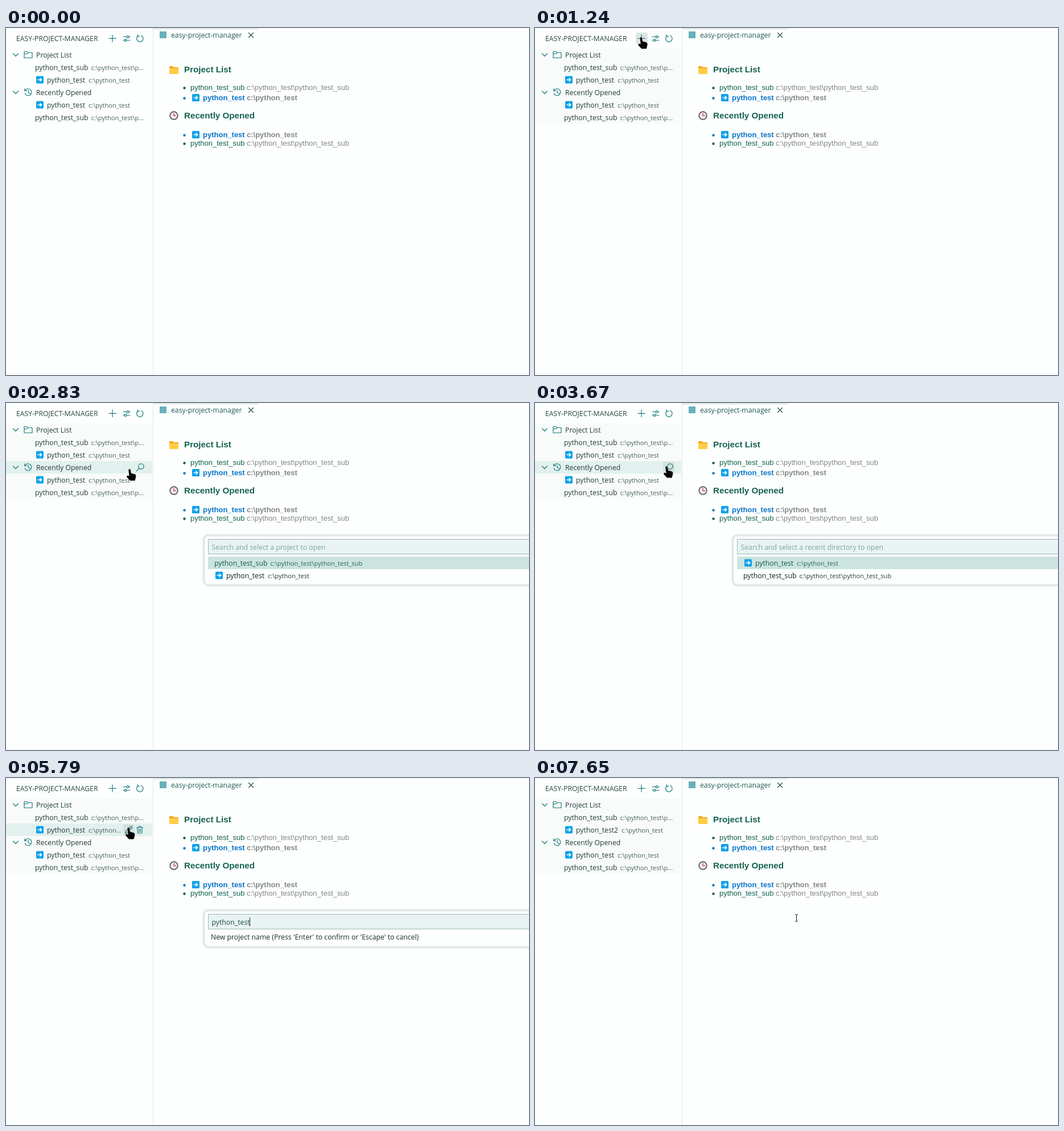
An HTML page for the animation above (8000 ms loop, 919 by 610 pixels).

```html
<!DOCTYPE html>
<html lang="en">
<head>
<meta charset="utf-8">
<title>Project manager</title>
<style>
html, body { margin: 0; width: 100%; height: 100%; overflow: hidden; background: #fcfffe; }
svg { display: block; width: 919px; height: 610px; }
text { font-family: "Open Sans", "Noto Sans", sans-serif; font-size: 12.25px; fill: #213b37; white-space: pre; }
.web { font-family: "Liberation Sans", Arial, sans-serif; font-size: 13px; }
.head { font-size: 15.2px; font-weight: bold; }
.bold { font-weight: bold; }
.desc { font-size: 11.1px; fill: #48605c; }
.icon { fill: none; stroke: #1b7a80; stroke-width: 1.2; stroke-linecap: round; stroke-linejoin: round; }
</style>
</head>
<body>
<svg id="stage" viewBox="0 0 919 610" xmlns="http://www.w3.org/2000/svg"></svg>
<script>
const LOOP = 8000;
const stage = document.getElementById('stage');
const TEST = 'python_test', SUB = 'python_test_sub';
const TEST_PATH = 'c:\\python_test', SUB_PATH = TEST_PATH + '\\' + SUB;

// Pointer path: time, x, y
const path = [
  [160, 486, 592], [240, 466, 522], [320, 427, 425], [360, 402, 388],
  [440, 292, 250], [520, 236, 170], [600, 210, 120], [680, 194, 98],
  [960, 194, 97], [1200, 186, 16], [1440, 187, 16], [1600, 212, 36],
  [1760, 231, 50], [1880, 229, 52], [2630, 229, 52], [2830, 217, 116],
  [3190, 229, 114], [3350, 229, 114], [3390, 231, 111], [4210, 231, 111],
  [4530, 215, 87], [5790, 215, 87], [5910, 268, 125], [6070, 380, 210],
  [6190, 425, 232], [6310, 438.5, 239], [6470, 438.5, 239], [6790, 459.5, 246]
];

function pointer(t) {
  const i = path.findIndex(k => k[0] > t);
  if (i === 0) return null;
  if (i < 0) return path[path.length - 1].slice(1);
  const [t0, x0, y0] = path[i - 1], [t1, x1, y1] = path[i];
  const f = (t - t0) / (t1 - t0);
  return [x0 + (x1 - x0) * f, y0 + (y1 - y0) * f];
}

const rect = (x, y, w, h, fill, more = '') =>
  `<rect x="${x}" y="${y}" width="${w}" height="${h}" fill="${fill}" ${more}/>`;
const text = (x, y, s, cls = '', fill = '') =>
  `<text x="${x}" y="${y}" class="${cls}"${fill && ` style="fill:${fill}"`}>${s}</text>`;
const icon = (d, more = '') => `<path class="icon" d="${d}" ${more}/>`;
const rowTop = i => 36 + 22 * i;

// Blue square with a white arrow, centred on x, y
const badge = (x, y) => rect(x - 6.5, y - 6.5, 13, 13, '#0aa2ea', 'rx="1.5"') +
  `<path d="M${x - 4} ${y}h7m-3-3 3 3-3 3" fill="none" stroke="#fff" stroke-width="1.7"/>`;

const lens = (x, y) =>
  `<circle class="icon" cx="${x + 1.5}" cy="${y - 1.5}" r="4.7"/>` + icon(`M${x - 2} ${y + 2}l-4.5 4.5`);

const pencil = icon('M209.5 97.5l1-4 8-8q1.300-1.300 2.600 0t0 2.600l-8 8zM217 87l2.600 2.600');
const trash = icon('M229.500 87h11M233 87v-2h4v2M230.800 87l.7 10h7l.7-10M233.700 89.500v5M236.300 89.500v5');

function toolbar(p) {
  const onAdd = p && p[1] < 30 && p[0] > 177 && p[0] < 198;
  return text(18, 23, 'EASY-PROJECT-MANAGER', 'title', '#2c4642')
    .replace('class="title"', 'font-size="10.9" class="title"') +
    (onAdd ? rect(177, 8, 21, 21, '#dce7e5', 'rx="4"') : '') +
    icon('M187 12v12.500M181 18.300h12.500') +
    icon('M206 15.500h6M216 15.500h2M206 21.500h2M212 21.500h6') +
    '<circle class="icon" cx="214" cy="15.5" r="1.9"/><circle class="icon" cx="210" cy="21.5" r="1.9"/>' +
    icon('M232 14a5.700 5.700 0 1 0 5.500-.7M231.200 11.500v3.200h3.300');
}

function tree(t, p) {
  const inTree = p && p[0] < 257 && p[1] >= 36 && p[1] < 168;
  const hover = inTree ? Math.floor((p[1] - 36) / 22) : -1;
  let s = '';
  for (let i = 0; i < 6; i++) {
    let fill = t >= (i < 2 ? 1040 : 600) ? '#f8fbfa' : '';
    if (i === hover) fill = '#e2f1ee';
    if (hover === 0 && i < 2) fill = '#ebf4f2';
    if (fill) s += rect(0, rowTop(i), 257, 22, fill);
  }
  const group = (i, label) => {
    const y = rowTop(i) + 11;
    return icon(`M12.500 ${y - 2}l4.500 4.500 4.500-4.500`) + text(53, y + 5, label);
  };
  const sub = i => text(51, rowTop(i) + 16, SUB) +
    text(149.5, rowTop(i) + 16, hover === i && i === 1 ? 'c:\\pyth...' : 'c:\\python_test\\p...', 'desc');
  const main = (i, label, x, dir) => badge(59.5, rowTop(i) + 11) +
    text(72, rowTop(i) + 16, label) + text(x, rowTop(i) + 16, dir, 'desc');
  const renamed = t >= 7630;

  s += group(0, 'Project List') + icon('M32 52.500v-11h5l1.500 2h7.500v9zM32 45.500h5l1.500-2');
  s += sub(1);
  s += main(2, renamed ? TEST + '2' : TEST, renamed ? 152 : 145, hover === 2 ? 'c:\\python...' : TEST_PATH);
  s += group(3, 'Recently Opened') + icon('M33.500 110a6 6 0 1 1-.3 4.800M32.800 106.800v3.700h3.700M39.200 109.500v4l3 1.800');
  s += main(4, TEST, 145, TEST_PATH) + sub(5);

  if (hover === 0 || hover === 3) {
    const y = rowTop(hover) + 11;
    if (p[0] > 225 && p[1] < y + 9 && (hover === 0 || t >= 3350))
      s += rect(225, y - 10, 20, 20, '#d3e2df', 'rx="4"');
    s += lens(236, y);
  }
  if (hover === 1 || hover === 2) {
    const onPencil = hover === 2 && p[0] > 207 && p[1] < 92;
    if (onPencil) s += rect(206, 81, 20, 20, '#d3e2df', 'rx="4"');
    s += `<g transform="translate(0 ${hover === 1 ? -22 : 0})">${pencil}${trash}</g>`;
  }
  return s;
}

function page() {
  const green = '#14624f', blue = '#0a74c9', gray = '#858787';
  const dot = (y, fill) => `<circle cx="313.500" cy="${y}" r="2.200" fill="${fill}"/>`;
  const sub = y => dot(y - 3.5, green) + text(324, y, SUB, 'web', green) + text(423, y, SUB_PATH, 'web', gray);
  const main = y => dot(y - 3.5, blue) + badge(333.5, y - 4.5) +
    text(346, y, TEST, 'web bold', blue) + text(423, y, TEST_PATH, 'web bold', gray);
  return rect(258, 0, 1, 610, '#dfe9e7') + rect(259, 1, 185, 1, '#bfd5d1') +
    rect(270, 6, 12, 12, '#68b0bb') +
    text(290, 17, 'easy-project-manager', '', '#1f5952') +
    icon('M426.500 8.500l8 8M434.500 8.500l-8 8', 'style="stroke:#1f4f49"') +
    '<path d="M287 80v-12q0-1 1-1h5l2 2h7q1 0 1 1v10z" fill="#f3ad22"/>' +
    '<path d="M287 71h16v9q0 1-1 1h-14q-1 0-1-1z" fill="#ffcd45"/>' +
    text(313, 78, 'Project List', 'web head', green) +
    sub(109) + main(127) +
    '<circle cx="295" cy="154" r="6.800" fill="#eceaec" stroke="#5b555b" stroke-width="1.700"/>' +
    '<path d="M295 149.500v4.700h4" fill="none" stroke="#c93b50" stroke-width="1.300"/>' +
    text(313, 159, 'Recently Opened', 'web head', green) +
    main(192) + sub(207);
}

const panel = bottom =>
  rect(347.5, 232.5, 640, bottom - 234, '#fcfffe', 'rx="8" stroke="#e3e8e7" stroke-width="4"') +
  rect(355.5, 239.5, 640, 26, '#e8f3f2', 'stroke="#9fb9b4"');
const caret = x => rect(x, 245, 1, 16, '#1b2f2c');

function picker(t) {
  const recent = t >= 3590;
  const item = (name, dir, y, on) => {
    const isTest = name === TEST;
    return (isTest ? badge(374.5, y - 5) : '') +
      text(isTest ? 387 : 366, y, name, '', on ? '#17594c' : '#10211e') +
      text(isTest ? 460 : 464.5, y, dir, 'desc', on ? '#2b665a' : '#2a3d3a');
  };
  const items = [[SUB, SUB_PATH], [TEST, TEST_PATH]];
  if (recent) items.reverse();
  const blink = [2130, 2630, 3190, 3670, 4210, 4730, 5300].filter(k => k <= t).length % 2;
  return panel(322) + rect(355, 270, 564, 22, '#cce4df') +
    text(361.5, 258, `Search and select a ${recent ? 'recent directory' : 'project'} to open`, '', '#7ba7a1') +
    item(...items[0], 286, true) + item(...items[1], 308, false) + (blink ? caret(361) : '');
}

function rename(t) {
  const second = t >= 7030;
  const typed = t >= 6630;
  const value = second ? TEST_PATH : typed ? TEST + '2' : TEST;
  const end = second ? 443 : typed ? 436 : 428;
  return panel(299) + text(361.5, 258, value, '', '#1d4a43') +
    text(360, 284, `New project ${second ? 'directory' : 'name'} (Press 'Enter' to confirm or 'Escape' to cancel)`, '', '#182b28') +
    (t >= 6040 && t < 6270 ? '' : caret(end));
}

function tooltip(t) {
  if (t < 4890 || t >= 5500) return '';
  const alpha = Math.min(1, (t - 4850) / 160);
  return `<g opacity="${alpha.toFixed(2)}">` +
    rect(178.5, 105, 75, 23, '#fdfffe', 'rx="3" stroke="#dfe6e4"') +
    text(186, 120, 'Edit Project', '', '#2a403c').replace('<text', '<text style="font-size:11.4px"').replace(' style="fill:#2a403c"', '') +
    '</g>';
}

function cursor(t, p) {
  if (!p) return '';
  const place = `transform="translate(${p[0].toFixed(1)} ${p[1].toFixed(1)})"`;
  if (t >= 6190)
    return `<path ${place} d="M-2.500-6h2l.5.500.500-.500h2M0-5.500v11M-2.500 6h2l.5-.500.500.500h2" fill="none" stroke="#1a1a1a"/>`;
  const hand = p[0] < 257 && p[1] < 168;
  const d = hand
    ? 'M-1.800 2Q-1.500 0 .2 0T2 2L3 7.500 9 9Q11.500 9.800 11.500 12.500L10.500 17 9.500 20.500H1L-4.500 14.500Q-5.500 11.500-3 11.500L-.5 12.500Z'
    : 'M0 0V17L4 13.500 7 20 10 18.500 7 12.500H12.500Z';
  return `<path ${place} d="${d}" fill="#050505" stroke="#fff" stroke-width="1.200" paint-order="stroke"/>`;
}

function draw(t) {
  const p = pointer(t);
  let s = rect(0, 0, 919, 610, '#fcfffe') + toolbar(p) + tree(t, p) + page();
  if (t >= 2130 && t < 5520) s += picker(t);
  if (t >= 5520 && t < 7630) s += rename(t);
  return s + tooltip(t) + cursor(t, p);
}

let last = '', start = null;
function tick(now) {
  if (start === null) start = now;
  const s = draw((now - start) % LOOP);
  if (s !== last) stage.innerHTML = last = s;
  requestAnimationFrame(tick);
}
stage.innerHTML = last = draw(0);
requestAnimationFrame(tick);
</script>
</body>
</html>
```
